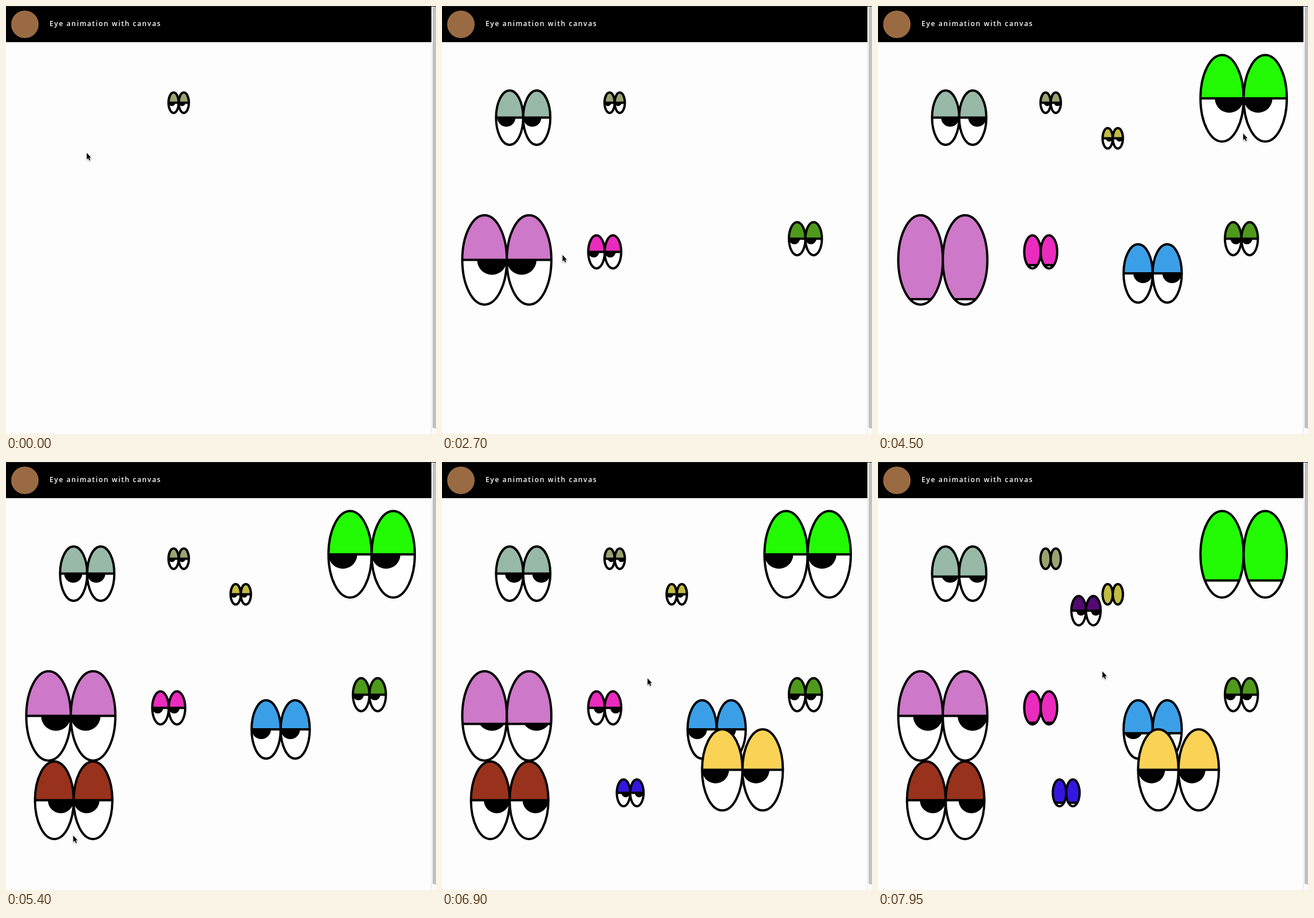
Animation of 751x746 px, one loop 8 s. Source, as an HTML page with a canvas:

```html
<!DOCTYPE html>
<html lang="en">
<head>
<meta charset="utf-8">
<title>Eye animation</title>
<style>
  html, body { margin: 0; width: 100%; height: 100%; overflow: hidden; background: #fdfdfd; }
  canvas { position: absolute; left: 0; top: 0; }
  header { position: absolute; left: 0; top: 0; width: 743px; height: 63px; background: #000; }
  .badge { position: absolute; left: 9px; top: 8px; width: 48px; height: 48px; border-radius: 50%; background: #9a6b43; }
  h1 {
    position: absolute; left: 76px; top: 22px; margin: 0; color: #fff; white-space: nowrap;
    font: 600 12px/18px "Open Sans", "Noto Sans", sans-serif; letter-spacing: 1.65px;
  }
  .track { position: absolute; left: 742px; top: 0; width: 8px; height: 746px; background: #fafafa; border-left: 1px solid #e6e6e6; }
  .thumb { position: absolute; left: 2px; top: 1px; width: 6px; height: 735px; background: #c1c1c1; border-radius: 3px 0 0 3px; }
  .edge { position: absolute; left: 0; top: 0; width: 751px; height: 1px; background: #222; }
</style>
</head>
<body>
<div class="track"><div class="thumb"></div></div>
<header><div class="badge"></div><h1>Eye animation with canvas</h1></header>
<div class="edge"></div>
<canvas id="stage" width="751" height="746"></canvas>
<script>
const LOOP = 8000, STEP = 150, BLINK = 263, MOUSE_LAG = 100;
const ctx = document.getElementById('stage').getContext('2d');

const eye = (born, x, y, r, color, ...blinks) => ({ born, x, y, r, color, blinks });
const eyes = [
  eye(0, 301.6, 169, 8.9, '#9aa370', 3450, 7950),
  eye(150, 141.8, 195, 23.7, '#99b9a8', 3658, 8185),
  eye(1050, 634.7, 406, 14.4, '#4f991b'),
  eye(1800, 284.2, 429, 14.4, '#ea2bbd', 4552, 7976),
  eye(2400, 113.2, 443, 38.9, '#cd78c8', 3508, 4532, 6270, 7116),
  eye(3300, 410, 231, 8.9, '#c2bc43', 7950),
  eye(4050, 479.7, 466.5, 25.4, '#3b9fe8', 8179),
  eye(4500, 638.6, 161.3, 37.7, '#22fb04', 8054),
  eye(5250, 118.2, 590, 33.8, '#98321c'),
  eye(5700, 328.7, 577, 11.7, '#3317e0', 5990, 8018),
  eye(6300, 524.8, 537, 35.3, '#f9d256'),
  eye(7200, 363.3, 259.5, 12.8, '#530a72')
];

// The pointer rests below each eye while it is placed, with a few stops in between.
const pause = (arrive, x, y) => ({ arrive, leave: arrive + 100, x, y });
const stops = eyes.slice(1)
  .map(e => ({ arrive: e.born - 150, leave: e.born + 200, x: e.x - 0.8, y: e.y + 61 }))
  .concat(pause(6050, 511, 604), pause(6800, 359, 377), pause(7850, 392, 365))
  .sort((a, b) => a.arrive - b.arrive);

const clamp = (v, lo, hi) => Math.min(hi, Math.max(lo, v));

function mouseAt(t) {
  const i = stops.findLastIndex(s => s.arrive <= t);
  const from = stops[Math.max(i, 0)], to = stops[i + 1] || from;
  const u = clamp((t - from.leave) / (to.arrive - from.leave), 0, 1);
  const k = to === from ? 0 : 1 - (1 - u) ** 2;
  return { x: from.x + (to.x - from.x) * k, y: from.y + (to.y - from.y) * k };
}

function lidAt(t, blinks) {
  return Math.max(0, ...blinks.map(b => 1 - Math.abs(t - b) / BLINK));
}

function drawEye(x, y, r, color, lid, mouseX) {
  const h = r * 2, lidY = y + h * lid;
  const outline = new Path2D();
  outline.ellipse(x, y, r, h, 0, 0, Math.PI * 2);
  ctx.fillStyle = '#fff';
  ctx.fill(outline);

  ctx.save();
  ctx.clip(outline);
  ctx.fillStyle = '#000';
  ctx.beginPath();
  ctx.arc(x + clamp(mouseX - x, -r / 3, r / 3), y, r * 2 / 3, 0, Math.PI * 2);
  ctx.fill();
  ctx.fillStyle = color;
  ctx.fillRect(x - r, y - h, r * 2, lidY - y + h);
  ctx.restore();

  ctx.strokeStyle = '#000';
  ctx.lineWidth = 4;
  const half = r * Math.sqrt(1 - lid * lid);
  ctx.beginPath();
  ctx.moveTo(x - half, lidY);
  ctx.lineTo(x + half, lidY);
  ctx.stroke();
  ctx.stroke(outline);
}

const arrow = new Path2D('M0 0V11.4L2.6 9L4.4 13.2L6.2 12.4L4.5 8.3H7.6Z');

function drawCursor({ x, y }) {
  ctx.save();
  ctx.translate(x, y);
  ctx.shadowColor = 'rgba(0,0,0,.35)';
  ctx.shadowBlur = 2;
  ctx.shadowOffsetY = 1;
  ctx.strokeStyle = '#fff';
  ctx.lineWidth = 1.6;
  ctx.stroke(arrow);
  ctx.shadowColor = 'transparent';
  ctx.fillStyle = '#000';
  ctx.fill(arrow);
  ctx.restore();
}

function draw(t) {
  ctx.clearRect(0, 0, 751, 746);
  const mouseX = mouseAt(t - MOUSE_LAG).x;
  for (const { born, x, y, r, color, blinks } of eyes) {
    if (t < born) continue;
    const lid = lidAt(t, blinks);
    for (const side of [-1, 1]) drawEye(x + side * r, y - 0.4, r, color, lid, mouseX);
  }
  drawCursor(mouseAt(t));
}

const start = performance.now();
function tick() {
  const t = (performance.now() - start) % LOOP;
  draw(Math.floor(t / STEP) * STEP);
  requestAnimationFrame(tick);
}
tick();
</script>
</body>
</html>
```
